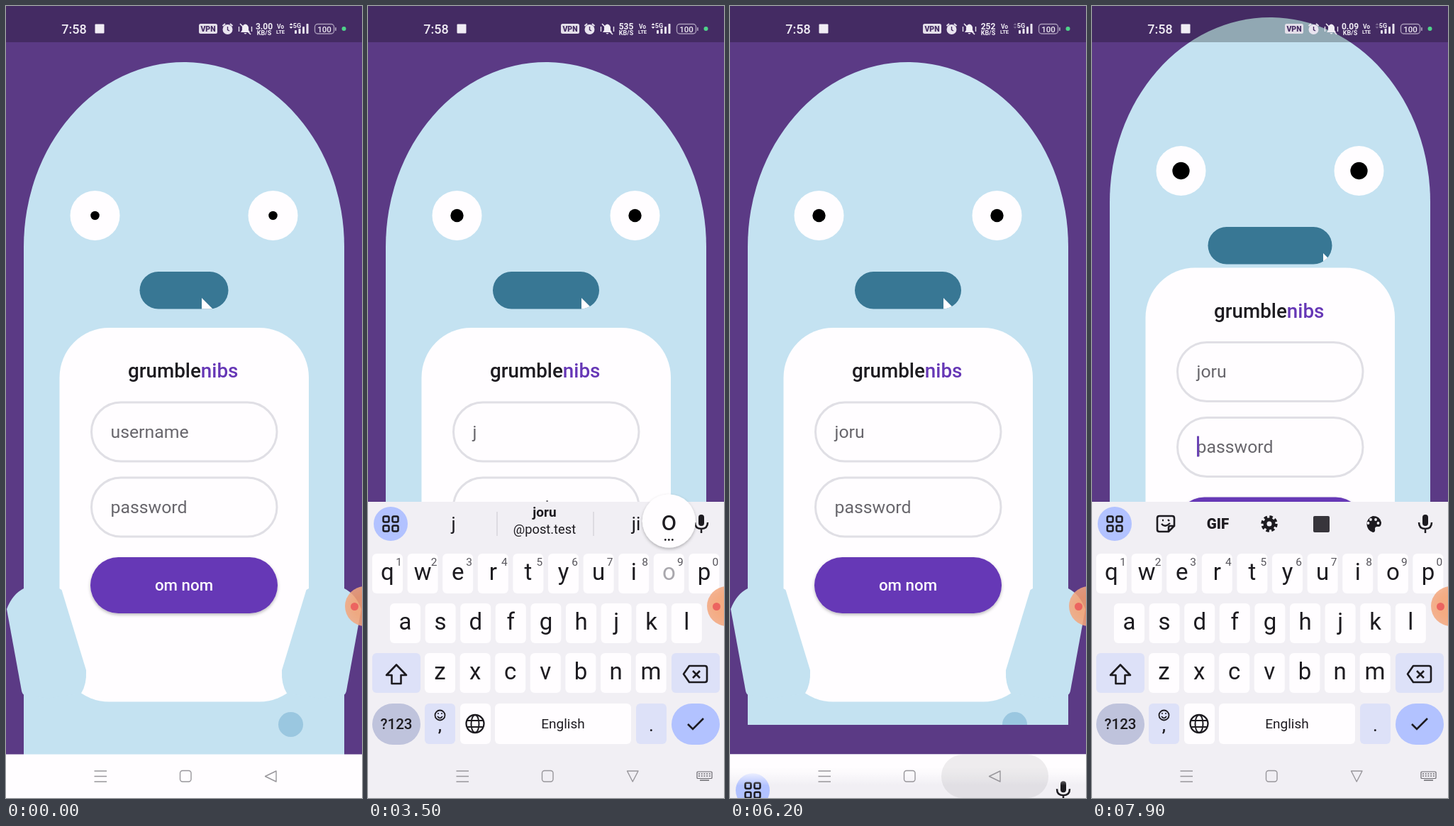
An HTML page that plays this animation: 502 by 1115 pixels, repeating every 8000 ms.

```html
<!DOCTYPE html>
<html lang="en">
<head>
<meta charset="utf-8">
<title>Monster login</title>
<style>
  html, body { margin: 0; width: 100%; height: 100%; overflow: hidden; background: #5b3a85; }
  svg { display: block; width: 502px; height: 1115px; font-family: Roboto, "Noto Sans", sans-serif; }
</style>
</head>
<body>
<svg id="stage" viewBox="0 0 502 1115" xmlns="http://www.w3.org/2000/svg"></svg>
<script>
const LOOP = 8000, INK = '#1d1b20', SOFT = '#dde1f8', PALE = '#fffdff';
const stage = document.getElementById('stage');
const $ = id => document.getElementById(id);

// ---- drawing helpers ----
const text = (x, y, size, str, extra = '') =>
  `<text x="${x}" y="${y}" font-size="${size}" text-anchor="middle" ${extra}>${str}</text>`;
const rect = (x, y, w, h, r, fill, extra = '') =>
  `<rect x="${x}" y="${y}" width="${w}" height="${h}" rx="${r}" fill="${fill}" ${extra}/>`;
const dot = (x, y, r, fill, extra = '') =>
  `<circle cx="${x}" cy="${y}" r="${r}" fill="${fill}" ${extra}/>`;
const line = (d, width, color = INK, extra = '') =>
  `<path d="${d}" fill="none" stroke="${color}" stroke-width="${width}" ${extra}/>`;

// ---- monster ----
const hand = `<path fill="#c4e2f1" d="M25 820Q9 828 1 849L22 964Q23 969 26 970L60 975L106 967.5
  Q114 955 113 935L78.500 822L75 820Z"/>`;
const eye = x => dot(x, 295, 35, PALE) + dot(x, 295, 6, '#000', 'class="pupil"');

const head = `<g id="head">
  <path d="M25 1200V339A226 260 0 0 1 477 339V1200Z" fill="#c4e2f1"/>
  ${eye(125.5)}${eye(376.5)}
  <g clip-path="url(#mouthClip)">
    <rect x="150" y="370" width="202" height="60" fill="#387794"/>
    <path id="tooth" d="M0 411L17 428H0Z" fill="${PALE}"/>
  </g></g>`;

const field = (y, id, str) =>
  rect(120.5, y, 261.5, 83, 41.500, 'none', 'stroke="#e0dfe5" stroke-width="3"') +
  `<text id="${id}" x="147.500" y="${y + 49.5}" font-size="24.800" fill="#68666c">${str}</text>`;

const card = `<g id="card">
  ${rect(75.5, 453, 351.5, 526.5, 70, PALE)}
  <text x="172" y="523" font-size="27.800" font-weight="500" fill="${INK}">grumble<tspan fill="#6637b6">nibs</tspan></text>
  ${field(558, 'user', 'username')}${field(664, 'pass', 'password')}
  ${rect(119, 776, 264, 79, 39.5, '#6637b6', 'filter="url(#low)"')}
  ${text(251, 823, 22.3, 'om nom', 'font-weight="500" fill="#fffdff"')}
  ${rect(0, 584, 3, 29, 0, '#6a42b4', 'id="caret"')}
  ${hand}<g transform="translate(502 0) scale(-1 1)">${hand}</g>
  ${dot(401.5, 1011.5, 17.5, '#9ac7e0')}
</g>`;

// ---- keyboard ----
const rows = [['qwertyuiop', 6, 771], ['asdfghjkl', 31, 841], ['zxcvbnm', 80, 911]];
const keyAt = {};
const letters = rows.map(([chars, x0, y]) => [...chars].map((c, i) => {
  const x = x0 + 49.6 * i;
  keyAt[c] = [x + 21.5, y + 28];
  const hint = y === 771 ? text(x + 37.5, y + 17, 15.5, (i + 1) % 10, 'fill="#55535a"') : '';
  return rect(x, y, 43, 56, 6, PALE) + text(x + 21.5, y + 37, 33, c, `id="key-${c}"`) + hint;
}).join('')).join('');

const gridIcon = [[21, 718], [34, 718], [21, 731], [34, 731]].map(([x, y]) =>
  rect(x + .5, y + .5, 8, 8, 2, 'none', `stroke="${INK}" stroke-width="2.500"`)).join('');

const mic = rect(466, 716, 8, 16, 4, INK) +
  line('M461 727Q461 736 470 736Q479 736 479 727M470 736V742', 2.5);

const tools = `<g id="tools" fill="${INK}">
  ${line('M95 718H113Q116 718 116 721V732L108 740H95Q92 740 92 737V721Q92 718 95 718M116 732H110Q108 732 108 735V740', 2.6)}
  ${line('M98 729Q103 735 110 728M99 724h2M107 723l2 2', 2.4)}
  ${text(177.5, 736, 20.5, 'GIF', 'font-weight="900"')}
  ${dot(250, 729, 6, 'none', `stroke="${INK}" stroke-width="5"`)}
  ${dot(250, 729, 9.7, 'none', `stroke="${INK}" stroke-width="4" stroke-dasharray="4.400 3.218"`)}
  ${rect(312, 718, 23, 23, 2, '#37353b')}
  <path d="M396 718A12 12 0 0 0 396 741Q400 741 399 736Q399 733 402 733H405Q408 732 408 727Q406 718 396 718Z"/>
  ${[[389.5, 728], [393, 723], [400, 723], [403.5, 728]].map(p => dot(...p, 1.9, '#f1eff4')).join('')}
</g>`;

const keyboard = `<g id="keyboard" fill="${INK}">
  <rect x="0" y="698" width="502" height="440" fill="#f1eff4"/>
  ${dot(32, 729, 24, '#b2c2ff')}${gridIcon}${mic}${tools}
  <g id="hints">
    ${line('M182 712V746M318 712V746', 1, '#c9c7ce')}
    <g id="words"></g>
  </g>
  ${letters}
  ${rect(6, 911, 68, 56, 6, SOFT)}
  ${line('M40 927.500L54 942H46.500V954H33.500V942H26Z', 2.6, INK, 'stroke-linejoin="round"')}
  ${rect(428, 911, 68, 56, 6, SOFT)}
  ${line('M453 929H475Q478 929 478 932V949Q478 952 475 952H453L445 940.500ZM458 936L468 946M468 936L458 946', 2.6, INK, 'stroke-linejoin="round"')}
  ${rect(6, 982, 68, 58, 29, '#bfc3dc')}
  ${text(40, 1018, 20.5, '?123', 'font-weight="500"')}
  ${rect(80, 982, 43, 57, 6, SOFT)}
  ${dot(101.5, 998.5, 7, 'none', `stroke="${INK}" stroke-width="1.800"`)}
  ${line('M98 1000Q101.500 1005 105 1000M98 996h2M103 996h2', 1.7)}
  ${text(101.5, 1021, 24, ',', 'font-weight="500"')}
  ${rect(130, 982, 43, 57, 6, PALE)}
  ${dot(151, 1010.5, 12.5, 'none', `stroke="${INK}" stroke-width="2.300"`)}
  <ellipse cx="151" cy="1010.500" rx="5.500" ry="12.500" fill="none" stroke="${INK}" stroke-width="2"/>
  ${line('M140 1006H162M140 1015H162', 2)}
  ${rect(179, 982, 192, 57, 6, PALE)}${text(275, 1017, 19, 'English')}
  ${rect(378, 982, 43, 57, 6, SOFT)}${text(399.5, 1021, 26, '.')}
  ${rect(428, 982, 68, 58, 29, '#b2c2ff')}
  ${line('M451 1011L458 1018L473 1003', 2.6)}
  <g id="popup">
    ${dot(0, 0, 37.5, PALE, 'filter="url(#low)"')}
    ${text(0, 13, 38, '', 'id="popLetter"')}
    ${[-5, 0, 5].map(x => dot(x, 26.5, 1.4, INK)).join('')}
  </g>
</g>`;

// ---- system bars ----
const bar = (x, h) => rect(x, 39 - h, 3, h, .8, '#e9e4ef');
const status = `
  <rect width="502" height="51" fill="#000" fill-opacity=".26"/>
  <g fill="#f1edf5">
    ${text(96, 39, 18, '7:58', 'font-weight="500"')}
    ${rect(125.5, 25.5, 13, 13, 1, '#f1edf5')}
    ${rect(272, 25, 26, 14, 2.5, '#e4dfe9')}
    ${text(285, 36, 10.5, 'VPN', 'font-weight="900" fill="#452c63"')}
    ${dot(312.5, 33, 7, '#e9e4ef')}
    ${line('M305.500 28L309 25M319.500 28L316 25', 2, '#e9e4ef')}
    ${line('M312.500 29V33.500L315 35', 1.4, '#452c63')}
    <path d="M331 37L333 34V30Q334 26 337.500 25.500Q341 26 342 30V34L344 37ZM335.500 38h4q-2 3-4 0Z"/>
    ${line('M330 25L345 40', 1.6, '#f1edf5')}
    ${line('M328.500 29V36M346.500 29V36', 1.3, '#f1edf5')}
    ${text(364, 32.500, 12, '', 'id="speed" font-weight="700"')}
    ${text(364, 41, 9, 'KB/S', 'font-weight="700"')}
    ${text(387, 31.500, 8.5, 'Vo', 'font-weight="700"')}${text(387, 39, 7.500, 'LTE', 'font-weight="700"')}
    <path id="arrows" d="M399.500 27L402 24L404.500 27ZM399.500 29L402 32L404.500 29Z"/>
    ${text(410.500, 31, 9, '5G', 'font-weight="700"')}
    ${bar(407, 5)}${bar(412.5, 7)}${bar(418, 10)}${bar(423.500, 14)}
    ${rect(435.5, 25.500, 27, 13.500, 4, 'none', 'stroke="#a99bb9" stroke-width="1.400"')}
    ${text(449, 36.500, 11.500, '100', 'font-weight="500"')}
    ${rect(464, 30, 1.800, 5, .8, '#a99bb9')}
  </g>
  ${dot(476.500, 32, 3, '#4fd38a')}`;

const nav = `<g fill="none" stroke="#98969b" stroke-width="1.400" stroke-linejoin="round">
  <path d="M124.500 1077H142M124.500 1084.500H142M124.500 1092H142"/>
  <rect x="245.500" y="1076.500" width="15.500" height="15.500" rx="3.500"/>
  <path id="back"/>
  </g>
  <g id="switcher">
    ${rect(464, 1078, 21, 9.500, 1, 'none', 'stroke="#6a686e" stroke-width="1.200"')}
    ${line('M466 1081H483M466 1084H483', 1.700, '#6a686e', 'stroke-dasharray="2 1.700"')}
    ${line('M468 1090H481', 1.500, '#6a686e')}
  </g>`;

const bubble = dot(506, 845, 28, 'url(#glow)', 'opacity=".86"') + dot(491.500, 845.500, 5.500, '#ec6460');

stage.innerHTML = `<defs>
  <clipPath id="mouthClip"><rect id="mouth" y="374" height="52.500" rx="26.250"/></clipPath>
  <clipPath id="roomClip"><rect id="room" width="502" height="1054"/></clipPath>
  <filter id="low" x="-20%" y="-20%" width="140%" height="150%">
    <feDropShadow dx="0" dy="2" stdDeviation="2" flood-opacity=".28"/></filter>
  <radialGradient id="glow"><stop offset=".55" stop-color="#f5a06f"/><stop offset="1" stop-color="#f3a77f"/></radialGradient>
  <linearGradient id="veilFill" x2="0" y2="1"><stop stop-color="${PALE}"/><stop offset=".55" stop-color="${PALE}" stop-opacity=".85"/>
    <stop offset="1" stop-color="${PALE}" stop-opacity="0"/></linearGradient>
  </defs>
  <rect width="502" height="1115" fill="#5b3a85"/>
  <g clip-path="url(#roomClip)">${head}${card}</g>
  <rect y="1053.500" width="502" height="62" fill="${PALE}"/>
  ${keyboard}
  <rect id="veil" y="1053.500" width="502" height="44" fill="url(#veilFill)"/>
  ${rect(298, 1054, 151, 61, 30, '#000', 'id="ripple"')}
  ${nav}${bubble}${status}`;

// ---- timeline ----
const NAME = 'joru', USER_TAP = 750, HIDE = 6000, PASS_TAP = 6900;
const presses = [['j', 2900], ['o', 3450], ['r', 4400], ['u', 4900]]
  .map(([key, down]) => ({ key, down, commit: Math.ceil((down + 100) / 100) * 100, up: down + 260 }));
const MAIL = 'mail';
const guesses = ['', ['j', MAIL, 'ji'], ['jo', 'job', 'joy'], ['jor', 'for', 'jot'],
  [NAME, 'Joru', MAIL]];
const speeds = [[6750, '0.09'], [3750, '252'], [750, '535'], [0, '3.00']];

const span = (t, start, length) => Math.min(1, Math.max(0, (t - start) / length));
const smooth = x => x * x * (3 - 2 * x);
const out = x => 1 - (1 - x) ** 3;
const set = (id, attrs) => {
  for (const k in attrs) $(id).setAttribute(k, attrs[k]);
};
const show = (id, on) => set(id, { visibility: on ? 'visible' : 'hidden' });
const put = (id, str) => { if ($(id).textContent !== str) $(id).textContent = str; };

// 0 is hidden, 1 is fully raised
const raised = t => t < HIDE
  ? out(span(t, USER_TAP + 80, 383))
  : 1 - smooth(span(t, HIDE, 250)) + out(span(t, PASS_TAP + 80, 383));

function guess(word, i) {
  const x = [120.5, 249, 378][i];
  return word === MAIL
    ? text(x, 718.500, 19, NAME, 'font-weight="600"') + text(x, 743, 18.300, '@post.test')
    : text(x, 738, 26, word);
}

let shownWords = -1;
function draw(t) {
  // monster
  const grow = smooth(span(t, USER_TAP + 130, 400)) + smooth(span(t, PASS_TAP + 130, 400));
  const lift = 84.5 * smooth(span(t, PASS_TAP + 237, 350));
  const half = 62.5 + 12.5 * grow;
  set('head', { transform: `translate(0 ${-Math.max(0, lift - 21.5)})` });
  set('card', { transform: `translate(0 ${-lift})` });
  set('mouth', { x: 251 - half, width: 2 * half });
  set('tooth', { transform: `translate(${276 + 25 * grow} 0)` });
  document.querySelectorAll('.pupil').forEach(p => p.setAttribute('r', 6.25 + 2.95 * grow));

  // typing
  const typed = presses.filter(p => t >= p.commit);
  const count = typed.length;
  put('user', count ? NAME.slice(0, count) : 'username');
  const inUser = t >= USER_TAP && t < HIDE, inPass = t >= PASS_TAP;
  const since = t - (inPass ? PASS_TAP : count ? typed[count - 1].commit : USER_TAP);
  show('caret', (inUser || inPass) && since % 1000 < 500);
  set('caret', {
    x: 148 + (inUser && count ? $('user').getComputedTextLength() : 0),
    y: inPass ? 690 : 584
  });

  // keyboard
  const up = raised(t), drop = 417 * (1 - up);
  set('keyboard', { transform: `translate(0 ${drop})`, display: up > 0 ? 'inline' : 'none' });
  set('room', { height: Math.min(1054, 698 + 417 * (1 - raised(t - 32))) });
  set('veil', { opacity: up > 0 ? span(drop, 300, 60) : 0 });
  set('tools', { display: !count || inPass ? 'inline' : 'none' });
  set('hints', { display: count && inUser ? 'inline' : 'none' });
  if (count !== shownWords) {
    shownWords = count;
    $('words').innerHTML = count ? guesses[count].map(guess).join('') : '';
  }
  const press = presses.find(p => t >= p.down && t < p.up);
  for (const p of presses) set('key-' + p.key, { fill: p === press ? '#a9a7ad' : INK });
  set('popup', { display: press ? 'inline' : 'none' });
  if (press) {
    const [x, y] = keyAt[press.key];
    set('popup', { transform: `translate(${x} ${y - 74})` });
    put('popLetter', press.key);
  }

  // system bars
  const open = inUser || inPass;
  set('back', { d: open ? 'M365.500 1077H381L373.200 1092Z' : 'M365.500 1084.500L381 1077V1092Z' });
  show('switcher', open && up > .5);
  set('ripple', { opacity: .065 * span(t, HIDE - 50, 120) * (1 - span(t, HIDE + 250, 250)) });
  put('speed', speeds.find(s => t >= s[0])[1]);
  set('arrows', { opacity: t < 4000 ? 1 : .3 });
}

const born = performance.now();
function tick() {
  draw((performance.now() - born) % LOOP);
  requestAnimationFrame(tick);
}
tick();
</script>
</body>
</html>
```
